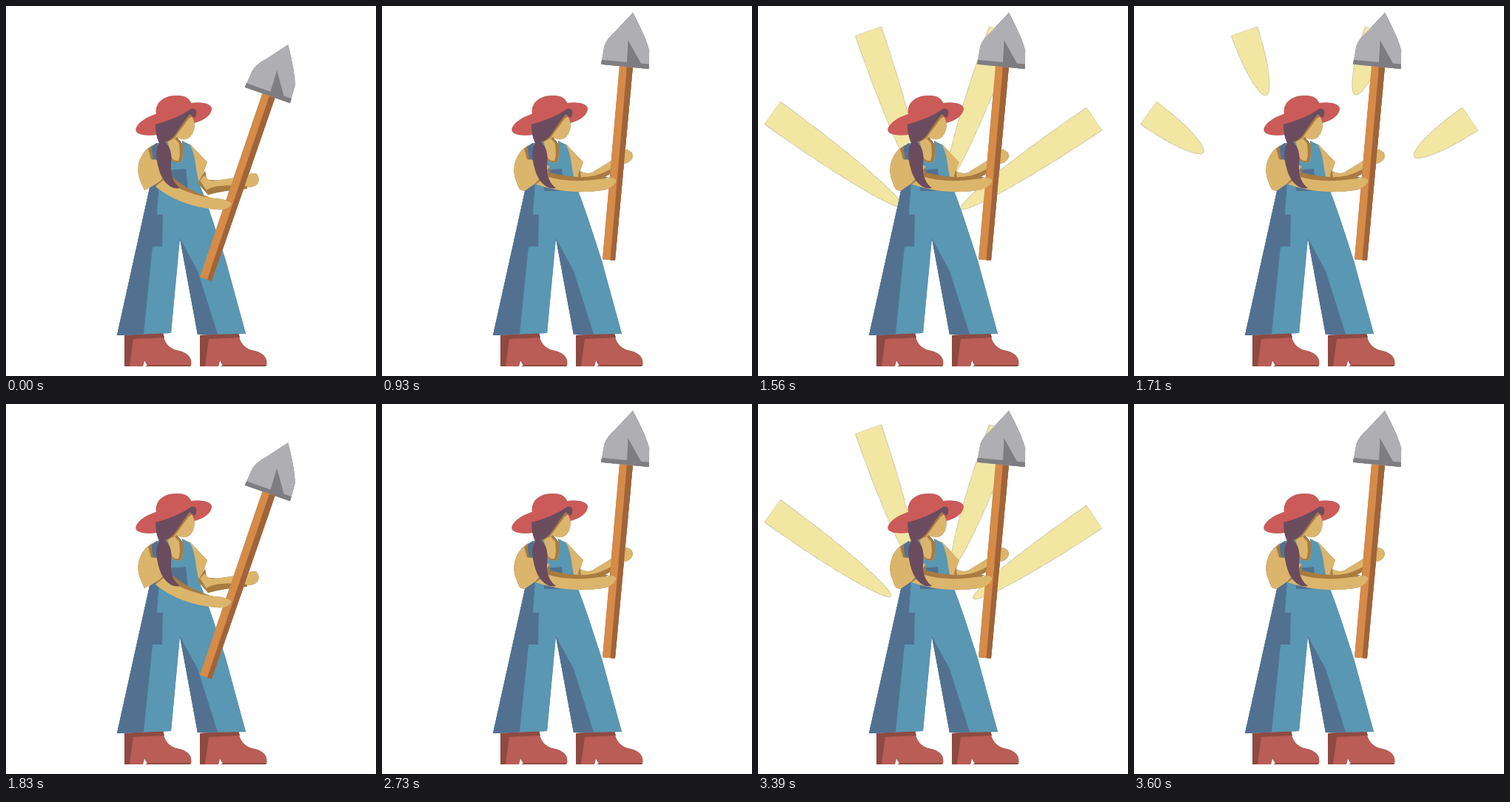
Write an HTML page without scripts that moves like this. It is 500 by 500 pixels and loops after 3.63 s.

```html
<!DOCTYPE html>
<html lang="en">
<head>
<meta charset="utf-8">
<title>Gardener raising a shovel</title>
<style>
  html, body { margin: 0; width: 100%; height: 100%; overflow: hidden; background: #fff; }
  svg { display: block; width: 100vw; height: 100vh; }
  .scene { filter: drop-shadow(0 0 .4px #777); }

  .skin { fill: #dcb56c; }
  .tan { fill: #a87b41; }
  .denim { fill: #5997b3; }
  .navy { fill: #527191; }
  .hair { fill: #6b4c5f; }
  .hat { fill: #cb5b58; }
  .boot { fill: #b95d56; }
  .sole { fill: #8e4a42; }
  .steel { fill: #afaeb3; }
  .iron { fill: #7e7d81; }
  .wood { fill: #d68b47; }
  .bark { fill: #a0643a; }
  .ray { fill: #f2e6a3; animation: burst 3630ms infinite; }

  .low, .high { animation: lowered 3630ms step-end infinite; }
  .high { animation-name: raised; }

  @keyframes lowered {
    0%, 50.4% { visibility: visible; }
    25.6%, 75.2%, 100% { visibility: hidden; }
  }
  @keyframes raised {
    0%, 50.4% { visibility: hidden; }
    25.6%, 75.2%, 100% { visibility: visible; }
  }
  /* Each ray grows outward from its inner tip, then retracts to its outer edge. */
  @keyframes burst {
    0%, 25.62%, 75.21% {
      transform: translateY(250px) scaleY(0);
      animation-timing-function: cubic-bezier(.3, .25, .6, 1);
    }
    33.06%, 82.64% { transform: translateY(0) scaleY(1); }
    41.32%, 90.91% {
      transform: translateY(0) scaleY(1);
      animation-timing-function: cubic-bezier(.4, .2, .75, .7);
    }
    49.59%, 99.17%, 100% { transform: translateY(0) scaleY(0); }
  }
</style>
</head>
<body>
<svg viewBox="0 0 500 500">
  <defs>
    <path id="ray" d="M-18.5 0C-18.5 137-9 250 0 250S18.5 137 18.5 0Z"/>
    <g id="boot">
      <path class="boot" d="M160 445L212 442C214 458 223 464 234 466C247 469 252 477 250 486H191L187 479L185 487H160Z"/>
      <path class="sole" d="M160 445L212 442L214 448L172 450L167 487H160ZM188 487L193 485H250L249 487Z"/>
    </g>
    <g id="shovel">
      <path class="wood" d="M-11-264H7L8.5 0H-8.5Z"/>
      <path class="bark" d="M-1-264H7L8.5 0H2Z"/>
      <path class="steel" d="M0-335.6Q21-304 27-287L28.7-262H-36L-34-287Q-31-298-22-307Z"/>
      <path class="iron" d="M-35.6-268H-1.5L-2.8-298L17.5-268.5H28.3L28.7-262H-36Z"/>
    </g>
  </defs>

  <g class="scene">
    <g transform="translate(19.5 144.5) rotate(-54.2)"><use href="#ray" class="ray"/></g>
    <g transform="translate(149 34) rotate(-18.9)"><use href="#ray" class="ray"/></g>
    <g transform="translate(330 34) rotate(20)"><use href="#ray" class="ray"/></g>
    <g transform="translate(454.5 152.5) rotate(56)"><use href="#ray" class="ray"/></g>

    <use href="#boot"/>
    <use href="#boot" x="102"/>

    <!-- shirt and overalls -->
    <path class="skin" d="M196 189L222 182L249 187L272 211L262 238L255 240L215 240Z"/>
    <path class="denim" d="M202 186L219 183L222 205Q226 213 236 211Q241 205 238 182L249 188Q255 200 257 220L261 240Q270 262 280 292L297 344L324 443L259 444L235 314L223 442L150 445L194 246L206 238Z"/>
    <path class="navy" d="M194 246L207 238L204 282H212L211 325H198L186 443.5L150 445Z"/>
    <path class="navy" d="M235 314L259 358L286 443.500L259 444Z"/>
    <path class="navy" d="M193 192L204 185L210 216L197 212Z"/>
    <path class="navy" d="M218 222L243 220L246 250H219Z"/>
    <path class="tan" d="M231 177L239 187Q240 206 236 211Q227 213 222 206L221 184Z"/>
    <path class="skin" d="M227 178L234 186Q236 203 233 209Q226 210 223 203L219 184Z"/>

    <g class="low">
      <path class="tan" d="M259 239L269 223L271 235L326 238V247Q300 248 273 255Z"/>
      <path class="skin" d="M262 236L268 229Q274 238 283 236L325 230Q333 224 339 227Q345 236 338 242Q331 247 323 243Q295 241 279 245Q273 247 271 249Z"/>
      <use href="#shovel" transform="translate(270 369) rotate(19.35)"/>
      <path class="skin" d="M196 189C180 200 175 218 181 235L187 249L216 233L210 209L198 207Z"/>
      <path class="tan" d="M192 193L196 190L199 208L196 207ZM201 243L214 231L226 232Q246 250 282 261L260 264L214 247Z"/>
      <path class="skin" d="M202 244L214 234Q242 255 282 260Q300 261 305 267Q300 277 285 275Q235 271 202 244Z"/>
    </g>

    <g class="high">
      <path class="tan" d="M265 230L267 221L270 234Z"/>
      <path class="skin" d="M268 223Q276 228 284 225L310 209Q323 196 331 194Q339 196 339 204Q336 212 324 214L292 231L269 234Z"/>
      <path class="tan" d="M270 231Q292 232 316 216L313 224L296 234H270Z"/>
      <use href="#shovel" transform="translate(306.5 343) rotate(5.56)"/>
      <path class="skin" d="M196 189C180 200 174 220 182 238Q185 252 194 249L207 240L227 217L210 209L198 207Z"/>
      <path class="tan" d="M192 193L196 190L199 208L196 207ZM207 241L226 218L227 225Q260 234 306 231L290 239L222 241Z"/>
      <path class="skin" d="M208 241L222 230Q250 239 285 235L312 232Q317 234 316 238Q311 247 298 249Q250 256 208 241Z"/>
    </g>

    <!-- head -->
    <path class="hat" d="M203 146C201 129 215 121 231 121C242 121 248 125 250 131C265 129 278 132 278 139C277 149 264 156 254 158L203 174C190 176 175 174 175.500 167C177 158 190 150 203 146Z"/>
    <path class="skin" d="M247 145Q254 151 255 161Q254 174 246 179Q238 182 231 177L217 184Z"/>
    <path class="tan" d="M246 143L252 149L247 152L227 179L216 185Z"/>
    <path class="hair" d="M202 160Q232 152 250 139Q256 137 257 142Q258 147 255 151L248 146Q239 158 229 173Q223 181 215 184C222 190 225 200 223 214C222 230 227 240 235 246C222 249 211 236 207 222C202 206 202 192 207 185C203 176 202 168 202 160Z"/>
  </g>
</svg>
</body>
</html>
```
